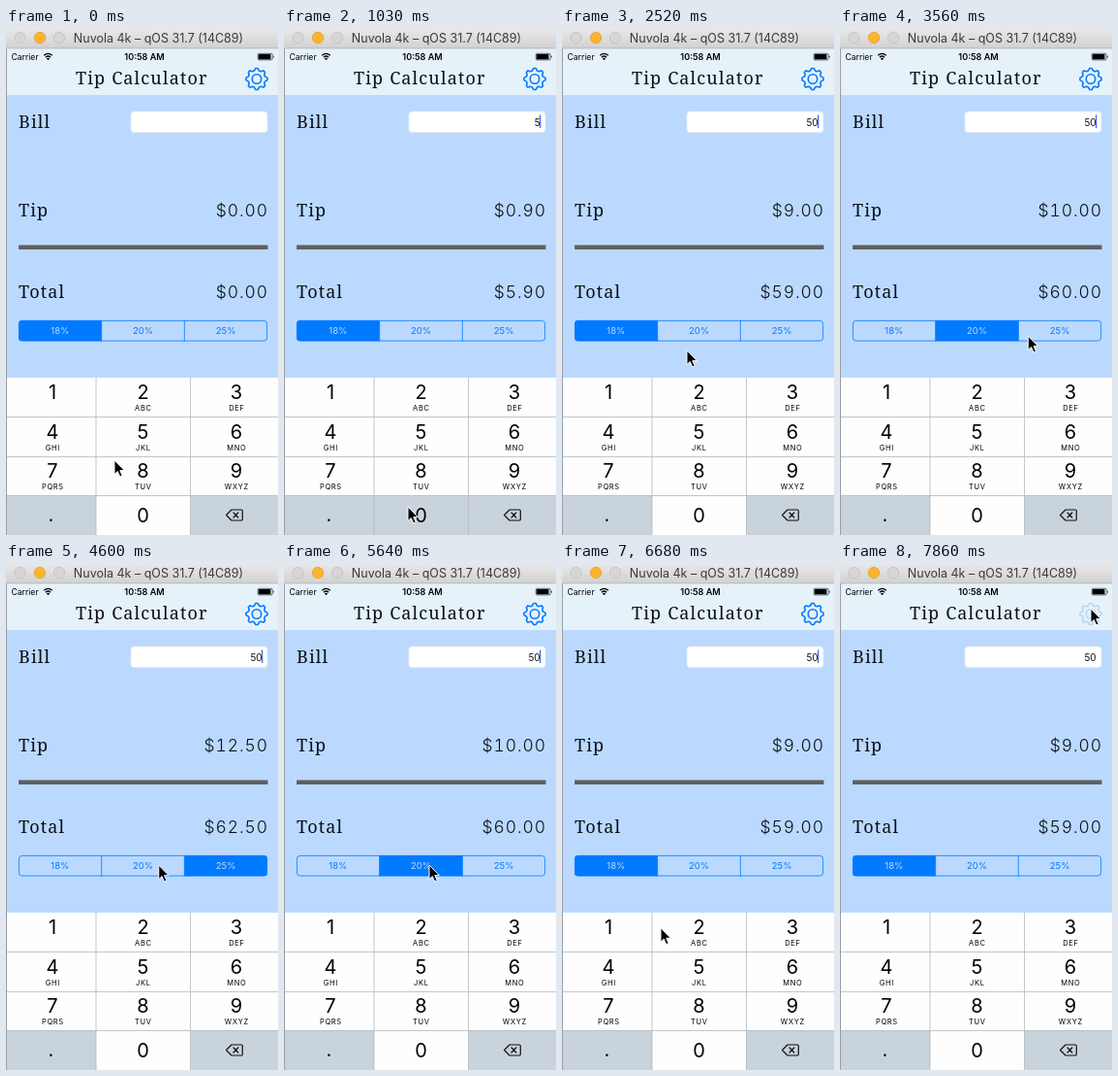
An HTML page that plays this animation: 281x522 px, repeating every 8000 ms.

```html
<!DOCTYPE html>
<html lang="en">
<head>
<meta charset="utf-8">
<title>Tip Calculator</title>
<style>
  html, body { margin: 0; width: 281px; height: 522px; overflow: hidden; background: #bbd9ff; }
  svg { display: block; font-family: Inter, Roboto, "Liberation Sans", sans-serif; }
  .mid { text-anchor: middle; }
  .end { text-anchor: end; }
  .type { font: 300 18px "Noto Serif", "Liberation Serif", serif; letter-spacing: 1.15px; fill: #0c1016; }
  .sum { font-size: 17.5px; font-weight: 300; letter-spacing: .9px; font-feature-settings: "tnum"; text-anchor: end; fill: #0c1016; }
  .digit { font-size: 20px; text-anchor: middle; }
  .abc { font-size: 7.5px; letter-spacing: .7px; text-anchor: middle; }
  .pct { font-size: 9.5px; text-anchor: middle; }
</style>
</head>
<body>
<svg width="281" height="522" viewBox="0 0 281 522">
  <defs>
    <linearGradient id="chrome" x2="0" y2="1">
      <stop stop-color="#e9e9e9"/><stop offset="1" stop-color="#d1d1d1"/>
    </linearGradient>
    <clipPath id="pill"><rect x="13" y="301" width="257" height="21.5" rx="3.5"/></clipPath>
  </defs>

  <rect width="281" height="522" fill="#bbd9ff"/>
  <rect y="21" width="281" height="48" fill="#e6f2f9"/>

  <!-- window bar -->
  <rect width="281" height="21" fill="url(#chrome)"/>
  <rect y="20.5" width="281" height=".8" fill="#b4b4b4"/>
  <g fill="#d6d6d6" stroke="#c0c0c0" stroke-width=".8">
    <circle cx="14.5" cy="10" r="5.7"/>
    <circle cx="35" cy="10" r="5.7" fill="#fdb42c" stroke="#dfa034"/>
    <circle cx="55" cy="10" r="5.7"/>
  </g>
  <text class="mid" x="157.5" y="15" font-size="12.5" fill="#3b3b3b">Nuvola 4k – qOS 31.7 (14C89)</text>

  <!-- status bar -->
  <text x="5.5" y="33" font-size="8.6">Carrier</text>
  <path d="M39.2 28.3Q43.5 24.3 47.8 28.3M40.9 30.2Q43.5 27.8 46.1 30.2" fill="none" stroke="#000" stroke-width="1.2"/>
  <path d="M41.9 31.4Q43.5 30 45.1 31.4L43.5 33.2Z"/>
  <text class="mid" x="143" y="33" font-size="9.1" font-weight="600">10:58 AM</text>
  <rect x="260.2" y="26.3" width="15" height="6.6" rx="1.2" fill="none" stroke="#000" stroke-width=".6"/>
  <rect x="260.9" y="27" width="12.6" height="5.2" rx=".5"/>
  <path d="M276 28.2q1.6 1.4 0 2.8z"/>

  <!-- header and form -->
  <text class="type" x="72" y="58">Tip Calculator</text>
  <g id="gear" fill="none" stroke="#007aff" stroke-width="1.6" stroke-linejoin="round">
    <path id="cog"/><circle cx="259" cy="52.5" r="4.7"/>
  </g>
  <text class="type" x="13" y="103">Bill</text>
  <rect x="128.8" y="85.8" width="141.4" height="22" rx="3.5" fill="#fff" stroke="#cfdcec" stroke-width=".7"/>
  <text id="bill" class="end" x="264.7" y="100.5" font-size="10" fill="#111"></text>
  <rect id="caret" x="264" y="89.5" width="1.3" height="13.5" fill="#426bf2"/>
  <text class="type" x="13" y="193.5">Tip</text>
  <text id="tip" class="sum" x="271" y="193.5"></text>
  <rect x="13" y="223.5" width="257.5" height="4.5" fill="#606060"/>
  <text class="type" x="13" y="278">Total</text>
  <text id="total" class="sum" x="271" y="278"></text>

  <!-- tip rates -->
  <rect id="pick" y="301" height="21.5" fill="#007aff" clip-path="url(#pill)"/>
  <g id="rates" stroke="#007aff" stroke-width=".8">
    <rect x="13.4" y="301.4" width="256.2" height="20.7" rx="3.2" fill="none"/>
  </g>

  <!-- keypad -->
  <rect y="360" width="281" height="162" fill="#fefefe"/>
  <g fill="#c9d3db">
    <rect y="481.5" width="93" height="41"/>
    <rect x="190.5" y="481.5" width="91" height="41"/>
    <rect id="press" x="93" width="97.5" height="40.5"/>
  </g>
  <path d="M0 400.5H281M0 441.5H281M0 481.5H281M93 360V522M190.5 360V522" stroke="#b3b9be" stroke-width=".8"/>
  <g id="keys"></g>
  <path d="M227.5 501.5L233 496H243Q244.3 496 244.3 497.3V505.7Q244.3 507 243 507H233ZM235 499L239.8 504M239.8 499L235 504"
        fill="none" stroke="#111" stroke-width="1.2" stroke-linejoin="round" stroke-linecap="round"/>
  <rect y="21" width="1" height="501" fill="#999fa6"/>

  <path id="cursor" d="M0 0V14.6L3.3 11.5L5.7 17L8.2 15.9L5.8 10.6H10.4Z" stroke="#fff" stroke-linejoin="round"/>
</svg>
<script>
const LOOP = 8000, TICK = 148.3, LAST = 53;
const RATES = [18, 20, 25], BILL = "50";
const LEFT = 13, SEG = 257 / 3;

// Ticks at which digits arrive, rates are tapped and the gear is pressed
const DIGITS = [3, 8], RATE_TAPS = [20, 28, 38, 43], GEAR_TAP = 52;

// Pointer moves between rests
const HOME = { x: 112, y: 445 };
const MOVES = [
  { from: 2, to: 5, x: 128, y: 493 },
  { from: 10, to: 14, x: 63, y: 325 },
  { from: 14, to: 17, x: 129, y: 332 },
  { from: 21, to: 25, x: 216, y: 312 },
  { from: 28, to: 31.4, x: 150, y: 311 },
  { from: 38, to: 41, x: 56, y: 311 },
  { from: 43, to: 46, x: 125, y: 408 },
  { from: 46, to: 49, x: 262, y: 85 },
  { from: 50, to: 52, x: 259, y: 47 }
];

const $ = id => document.getElementById(id);
const passed = (ticks, k) => ticks.filter(tick => tick <= k).length;

function add(parent, tag, attrs, text = "") {
  const el = document.createElementNS("http://www.w3.org/2000/svg", tag);
  for (const name in attrs) el.setAttribute(name, attrs[name]);
  el.textContent = text;
  parent.append(el);
  return el;
}

function pointer(k) {
  let { x, y } = HOME;
  for (const move of MOVES) {
    const u = Math.min(1, Math.max(0, (k - move.from) / (move.to - move.from)));
    x += (move.x - x) * u;
    y += (move.y - y) * u;
  }
  // Rises onto the middle rate before the first tap there
  if (k > 17 && k <= 21) y -= Math.min(20, (k - 17) * 10);
  return [x, y];
}

// Eight teeth: the radius steps out and in around the hub
function cogPath() {
  const pts = [];
  for (let i = 0; i < 32; i++) {
    const r = i % 4 === 1 || i % 4 === 2 ? 11.1 : 8.9;
    const a = (i - 1.5) * Math.PI / 16;
    pts.push((259 + r * Math.cos(a)).toFixed(2) + " " + (52.5 + r * Math.sin(a)).toFixed(2));
  }
  return "M" + pts.join("L") + "Z";
}

$("cog").setAttribute("d", cogPath());

const labels = RATES.map((rate, i) => {
  const x = LEFT + SEG * i;
  if (i) add($("rates"), "path", { d: `M${x} 301V322.5` });
  return add($("rates"), "text", { class: "pct", x: x + SEG / 2, y: 315.2, stroke: "none" }, rate + "%");
});

["", "ABC", "DEF", "GHI", "JKL", "MNO", "PQRS", "TUV", "WXYZ"].forEach((abc, i) => {
  const x = 48 + 95 * (i % 3) - (i % 3 === 1 ? 1.5 : 0), y = 382 + 40.6 * Math.floor(i / 3);
  add($("keys"), "text", { class: "digit", x, y }, i + 1);
  add($("keys"), "text", { class: "abc", x: x + .4, y: y + 11.9 }, abc);
});
add($("keys"), "text", { class: "digit", x: 141.5, y: 509 }, "0");
add($("keys"), "text", { class: "digit", x: 46.5, y: 508 }, ".");

// Steady while typing, then blinking once a second
function caretOn(t) {
  if (t < 1800) return t >= 300;
  return t % 1000 >= 250 && t % 1000 < 800;
}

function draw(t) {
  const k = Math.min(LAST, Math.floor((t + 15) / TICK));
  const bill = BILL.slice(0, passed(DIGITS, k));
  const pick = 2 - Math.abs(2 - passed(RATE_TAPS, k)); // up through the rates and back
  const tip = bill * RATES[pick] / 100;

  $("bill").textContent = bill;
  $("tip").textContent = "$" + tip.toFixed(2);
  $("total").textContent = "$" + (+bill + tip).toFixed(2);
  $("caret").style.opacity = +caretOn(k * TICK);

  $("pick").setAttribute("x", LEFT + SEG * pick);
  $("pick").setAttribute("width", SEG);
  labels.forEach((el, i) => el.setAttribute("fill", i === pick ? "#bbd9ff" : "#007aff"));

  // A key darkens just before its digit arrives
  $("press").setAttribute("y", bill ? 481.5 : 401);
  $("press").style.opacity = +DIGITS.includes(k + 1);
  $("gear").style.opacity = k >= GEAR_TAP ? .22 : 1;

  $("cursor").setAttribute("transform", `translate(${pointer(k)})`);
}

const start = performance.now();
function loop() {
  draw((performance.now() - start) % LOOP);
  requestAnimationFrame(loop);
}
loop();
</script>
</body>
</html>
```
